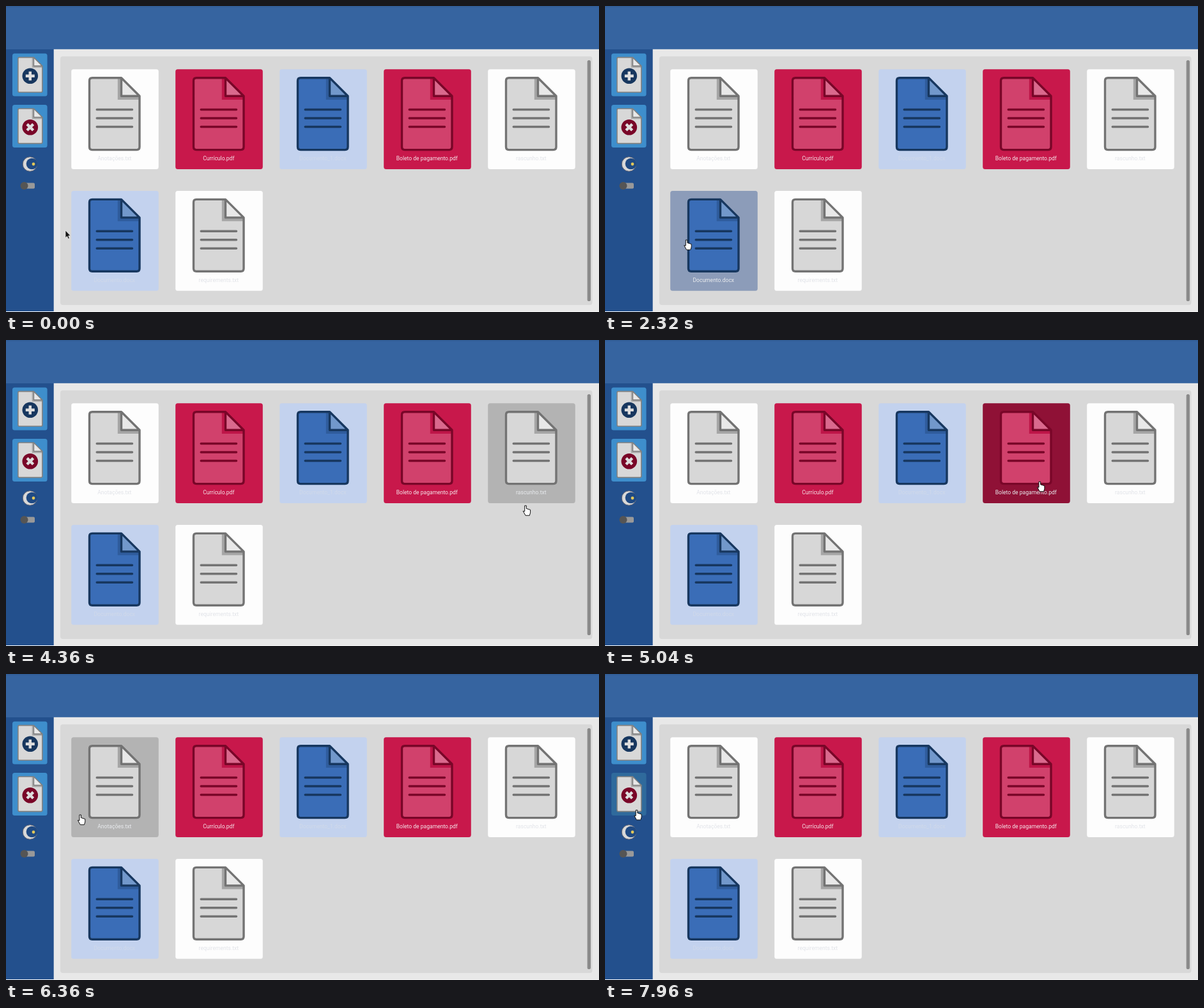
Write an HTML page that moves like this. It is 928 by 480 pixels and loops after 8000 ms.

```html
<!DOCTYPE html>
<html lang="pt">
<head>
<meta charset="utf-8">
<title>Documentos</title>
<style>
  html, body { margin: 0; width: 100%; height: 100%; overflow: hidden; background: #fff; }
  svg { display: block; width: 928px; height: 480px; }
  text { font: 8.55px Roboto, sans-serif; text-anchor: middle; }
  .txt  { --bg: #fdfdfd; --over: #b3b3b3; --body: #d7d7d7; --ink: #737373; --fold: #e8e8e8; --shade: #a5a5a5; --label: #e1e3e8; }
  .docx { --bg: #c3d2ee; --over: #8c9cb9; --body: #3a6db7; --ink: #17375f; --fold: #7298cb; --shade: #2f5c9c; --label: #d0d9e9; }
  .pdf  { --bg: #c8184b; --over: #8f1136; --body: #d1416c; --ink: #790628; --fold: #da698d; --shade: #be1548; --label: #f4e6ea; }
  .button { --bg: #3e8ecc; --over: #2f6a9c; --body: #d8d8d8; --ink: #808080; --fold: #e8e8e8; --shade: #a9a9a9; }
  .back { fill: var(--bg); }
  .over .back { fill: var(--over); }
  .body { fill: var(--body); }
  .shade { fill: var(--shade); }
  .fold { fill: var(--fold); }
  .ink { fill: none; stroke: var(--ink); stroke-linecap: round; stroke-linejoin: round; }
  .card text { fill: var(--label); }
  .card.over text { fill: #e9ebee; }
</style>
</head>
<body>
<svg viewBox="0 0 928 480">
  <rect width="928" height="68" fill="#3664a0"/>
  <rect width="928" height="2" fill="#325e98"/>
  <rect y="68" width="75" height="411" fill="#23508d"/>
  <rect x="74.7" y="67.8" width="854" height="411.7" fill="#e8e8e8"/>
  <rect x="85" y="79" width="832.5" height="390" rx="4" fill="#d8d8d8"/>
  <rect x="909.7" y="85" width="5.3" height="378" rx="2.6" fill="#8a8a8a"/>
  <g id="items"></g>

  <g id="moon">
    <circle cx="37.5" cy="248" r="11.3" fill="#d9d9d9" stroke="#5f6270"/>
    <circle cx="40.5" cy="247.5" r="8.8" fill="#1f4a84"/>
    <circle cx="43" cy="248" r="2.4" fill="#e0c65a"/>
  </g>
  <rect x="25" y="277.5" width="20" height="9" rx="2" fill="#999"/>
  <circle cx="28.5" cy="282" r="6" fill="#555"/>

  <g id="cursor">
    <path id="arrow" d="M0 0V11.6L2.6 9.3L4.4 13.3L6.3 12.4L4.6 8.6H8Z" fill="#111" stroke="#eee" stroke-width=".7"/>
    <path id="hand" d="M-1.3 0H1.3V4.5L7.6 6.5V11L6.3 15.4H0L-3.8 8.5L-1.3 9Z" fill="#fff" stroke="#111" stroke-linejoin="round"/>
  </g>
</svg>
<script>
const LOOP = 8000;
const CARD = { width: 136.6, height: 156.9 };
const BUTTON = { width: 54.6, height: 67 };
const fileNames = [
  'Anotações.txt', 'Currículo.pdf', 'Documento_1.docx', 'Boleto de pagamento.pdf',
  'rascunho.txt', 'Documento.docx', 'requirements.txt',
];

// Sheet of paper with a folded top right corner
function sheet(x, y, w, h, fold, radius, line) {
  const right = x + w, bottom = y + h, crease = right - fold, drop = fold / 5;
  const outline = `M${x + radius} ${y}H${crease}l${fold} ${fold}V${bottom - radius}`
    + `q0 ${radius} ${-radius} ${radius}H${x + radius}q${-radius} 0 ${-radius} ${-radius}`
    + `V${y + radius}q0 ${-radius} ${radius} ${-radius}z`;
  const corner = `M${crease} ${y}v${fold}h${fold}`;
  return `<path class="body" d="${outline}"/>
    <path class="shade" d="M${crease - drop} ${y}h${drop}l${fold} ${fold}v${drop}h${-fold - drop}z"/>
    <path class="fold" d="${corner}z"/>
    <path class="ink" stroke-width="${line}" d="${outline}${corner}"/>`;
}

function item(kind, x, y, size, content) {
  return `<g class="${kind}" transform="translate(${x} ${y})">
    <rect class="back" width="${size.width}" height="${size.height}" rx="3.5"/>${content}</g>`;
}

function card(name, i) {
  const x = 102.2 + i % 5 * 163;
  const y = 99.2 + Math.floor(i / 5) * 190.7;
  const lines = [0, 1, 2].map(n => `M40 ${63.3 + n * 13.5}h55.3`).join('');
  return item(`card ${name.split('.').pop()}`, x, y, CARD, `
    ${sheet(28.3, 13.5, 78.5, 112.9, 28.5, 4.5, 3.4)}
    <path class="ink" stroke-width="3.4" d="${lines}"/>
    <text x="67.6" y="142.7">${name}</text>`);
}

function button(y, color, arm, angle) {
  return item('button', 10, y, BUTTON, `
    ${sheet(8.9, 6, 38, 54.6, 13.5, 2, 1.6)}
    <g transform="translate(27.8 35.2) rotate(${angle})">
      <circle r="12.3" fill="${color}"/>
      <path d="M${-arm} 0H${arm}M0 ${-arm}V${arm}" stroke="#dedede" stroke-width="4.4"/>
    </g>`);
}

const items = document.getElementById('items');
items.innerHTML = fileNames.map(card).join('')
  + button(74.6, '#17375f', 7, 0) + button(155, '#790628', 6.8, 45);

// Cards react slightly outside their edges.
const targets = [...items.children].map(node => {
  const { e: x, f: y } = node.transform.baseVal[0].matrix;
  const isCard = node.classList.contains('card');
  return { node, x, y, ...(isCard ? CARD : BUTTON), margin: isCard ? 5 : 0 };
});

// Pointer stops: time, x, y
const stops = [
  [0, 93, 352], [1840, 93, 352], [2320, 127.5, 367], [3120, 329, 391],
  [4360, 813, 260], [4640, 805, 218], [5560, 416.5, 228.5], [6360, 116.5, 221],
  [6640, 46, 198], [7160, 37, 112], [7400, 37, 112], [7960, 49.5, 213.5], [LOOP, 49.5, 213.5],
];

const slope = (i, axis) => i < 0 || i > stops.length - 2 ? 0
  : (stops[i + 1][axis] - stops[i][axis]) / (stops[i + 1][0] - stops[i][0]);

// Harmonic mean of neighbouring slopes: smooth, without overshoot
function tangent(i, axis) {
  const before = slope(i - 1, axis), after = slope(i, axis);
  return before * after > 0 ? 2 * before * after / (before + after) : 0;
}

function pointerAt(time, axis) {
  const i = stops.findIndex(stop => stop[0] > time) - 1;
  const span = stops[i + 1][0] - stops[i][0];
  const k = (time - stops[i][0]) / span, rest = 1 - k;
  return stops[i][axis] * rest * rest * (1 + 2 * k)
    + stops[i + 1][axis] * k * k * (3 - 2 * k)
    + span * k * rest * (tangent(i, axis) * rest - tangent(i + 1, axis) * k);
}

const [cursor, arrow, hand] = ['cursor', 'arrow', 'hand'].map(id => document.getElementById(id));

function draw() {
  const time = performance.now() % LOOP;
  const x = pointerAt(time, 1), y = pointerAt(time, 2);
  let hovering = false;
  for (const { node, margin, ...box } of targets) {
    const over = x >= box.x - margin && x <= box.x + box.width + margin
      && y >= box.y - margin && y <= box.y + box.height + margin;
    node.classList.toggle('over', over);
    hovering ||= over;
  }
  cursor.setAttribute('transform', `translate(${x} ${y})`);
  arrow.style.display = hovering ? 'none' : '';
  hand.style.display = hovering ? '' : 'none';
  requestAnimationFrame(draw);
}
draw();
</script>
</body>
</html>
```
